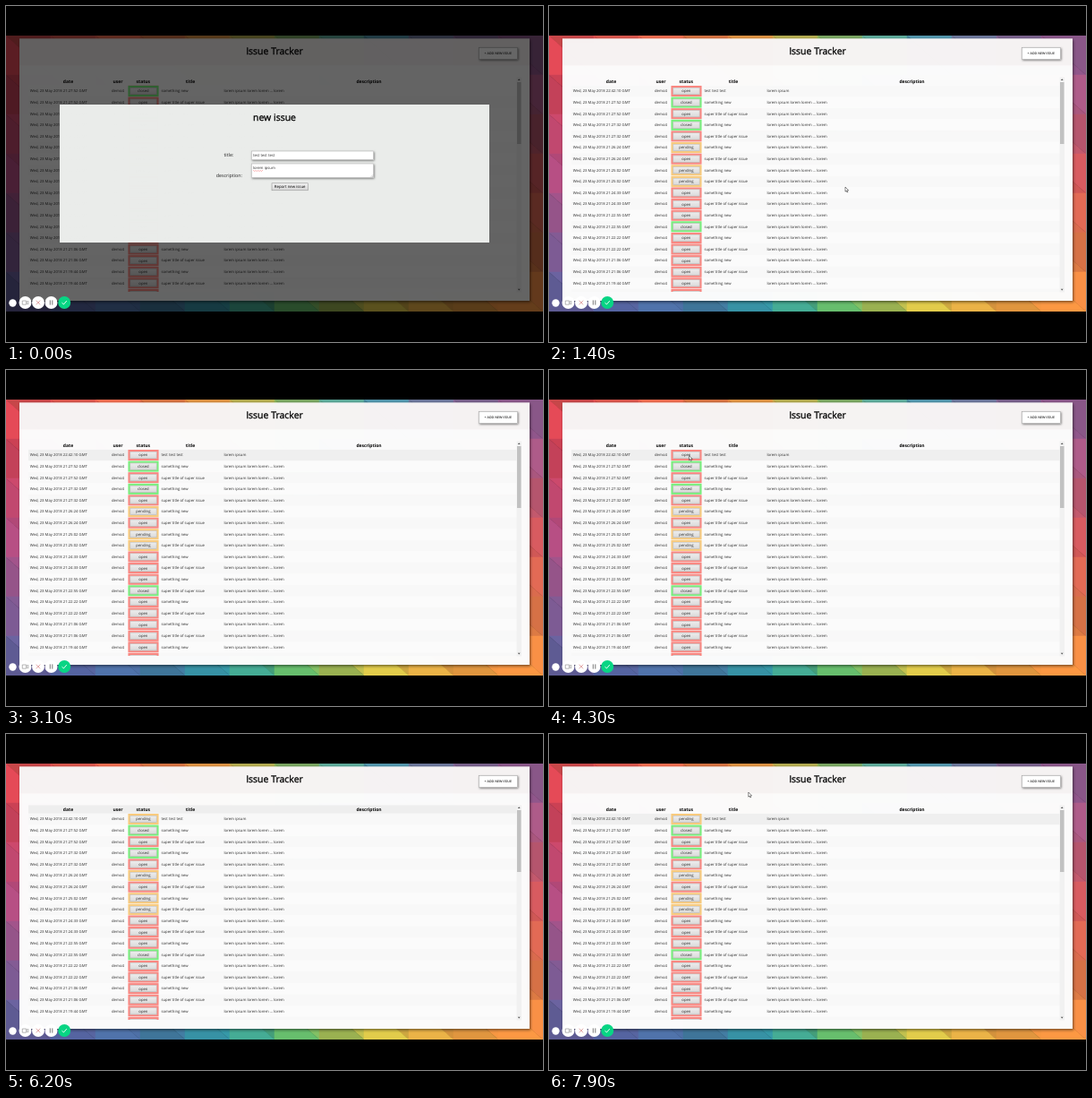
Recreate the animation shown at these times as an HTML page. Size 600 by 375 pixels, loop 8000 ms.

```html
<!DOCTYPE html>
<html lang="en">
<head>
<meta charset="utf-8">
<title>Issue Tracker</title>
<style>
  html, body { margin: 0; width: 100%; height: 100%; overflow: hidden; background: #000; }
  svg { display: block; width: 100vw; height: 100vh; font-family: "Open Sans", sans-serif; text-rendering: geometricPrecision; }
  .mid { text-anchor: middle; }
  .big { font-size: 10.5px; stroke: #000; stroke-width: .3; }
  .head { font-size: 5px; font-weight: 700; }
  .cell { font-size: 4.23px; fill: #2b2b2b; }
  .label { font-size: 5.3px; fill: #222; }
</style>
</head>
<body>
<svg id="stage" viewBox="0 0 600 375">
  <defs>
    <clipPath id="screen"><rect y="33" width="600" height="308"/></clipPath>
    <clipPath id="list"><rect x="25" y="88.6" width="546" height="230.4"/></clipPath>
    <linearGradient id="face" x2="0" y2="1"><stop stop-color="#f1f1f1"/><stop offset="1" stop-color="#d6d6d6"/></linearGradient>
    <filter id="soft" x="-10%" y="-20%" width="120%" height="140%"><feDropShadow dx=".8" dy="1" stdDeviation=".9" flood-opacity=".5"/></filter>
    <filter id="deep" x="-5%" y="-5%" width="110%" height="110%"><feDropShadow dx="1" dy="1.5" stdDeviation="1.5" flood-opacity=".55"/></filter>
  </defs>
  <g clip-path="url(#screen)">
    <g id="poly"></g>
    <g filter="url(#deep)">
      <rect x="15" y="36.5" width="570" height="292.5" fill="#fff" fill-opacity=".95"/>
    </g>
    <rect x="15" y="36.5" width="570" height="30" fill="#f3efef" fill-opacity=".6"/>
    <rect x="15" y="66.5" width="570" height="262.5" fill="#fcfcfc" fill-opacity=".6"/>
    <text class="big mid" x="300" y="54">Issue Tracker</text>
    <rect x="528.5" y="46.5" width="43" height="13" fill="#fff" stroke="#999" stroke-width=".5" filter="url(#soft)"/>
    <text class="mid" x="549.8" y="54.3" font-size="3.6" font-weight="600" fill="#222">+ ADD NEW ISSUE</text>
    <rect id="headHover" x="25" y="79.5" width="546" height="9.2" fill="#eee"/>
    <g id="heads"></g>
    <g clip-path="url(#list)"><g id="rows"></g></g>
    <rect x="570.5" y="79.5" width="5.5" height="240" fill="#f1f1f1"/>
    <rect x="571" y="85" width="4.5" height="69" fill="#c1c1c1"/>
    <path d="M571.8 83l1.4-1.7 1.4 1.7zM571.8 315.8l1.4 1.7 1.4-1.7z" fill="#555"/>

    <g id="modal">
      <rect y="33" width="600" height="308" fill="#000" fill-opacity=".6"/>
      <rect x="60" y="110" width="480" height="154" fill="#eef0ee" fill-opacity=".975"/>
      <text class="big mid" x="300" y="128">new issue</text>
      <text class="label" x="243.5" y="168.3">title:</text>
      <text class="label" x="234.8" y="191">description:</text>
      <g fill="#fff" stroke="#aaa" stroke-width=".5" filter="url(#soft)">
        <rect x="274.3" y="162" width="136.3" height="9.6"/>
        <rect x="274.3" y="176" width="136.3" height="15.5"/>
      </g>
      <text class="cell" x="276" y="168.3" font-size="4.3">test test test</text>
      <text class="cell" x="276" y="182.4" font-size="4.3">lorem ipsum</text>
      <path d="M276 184q.5-1 1 0t1 0 1 0 1 0 1 0 1 0 1 0 1 0 1 0 1 0 1 0" fill="none" stroke="#e33" stroke-width=".4"/>
      <path d="M407.5 191l2.6-2.6M409 191l1.1-1.1" stroke="#888" stroke-width=".4"/>
      <rect id="send" x="297" y="197.8" width="40.5" height="8" fill="url(#face)" stroke="#888" stroke-width=".5"/>
      <text class="mid" x="317.2" y="203.4" font-size="4.35">Report new issue</text>
    </g>
  </g>

  <g id="toolbar" fill="#fff">
    <circle cx="7.5" cy="331.5" r="4.2"/>
    <circle cx="21.5" cy="331" r="7"/>
    <circle cx="36" cy="331" r="7"/>
    <circle cx="50.5" cy="331" r="7"/>
    <circle cx="65.2" cy="331" r="7" fill="#08d584"/>
    <g fill="none" stroke="#999" stroke-width=".7">
      <path d="M18.3 329h4.3v4.2h-4.3zM22.6 330.5l2.2-1.2v3.6l-2.2-1.2"/>
      <path d="M33.7 328.7l4.6 4.6m0-4.6l-4.6 4.6" stroke="#d98a8a"/>
      <path d="M49.3 328.4v5.2m2.5-5.2v5.2" stroke="#777" stroke-width="1"/>
      <path d="M62.5 331.2l1.9 1.8 3.4-3.9" stroke="#fff" stroke-width=".9"/>
    </g>
  </g>
  <path id="cursor" d="M0 0v5.2l1.2-1.1.8 1.9.9-.4-.8-1.8h1.6z" fill="#fff" stroke="#000" stroke-width=".45"/>
</svg>
<script>
const LOOP = 8000, PITCH = 12.61, MODAL_END = 1400, STATUS_CHANGE = 4500;
const $ = id => document.getElementById(id);
const COLORS = { open: '#f98781', closed: '#78ee7c', pending: '#f8ca7d' };

// Low-poly backdrop: the hue runs round the screen.
const stops = [
  [-180, 180, 75, 125], [-158, 214, 66, 82], [-120, 232, 142, 66], [-85, 150, 185, 85],
  [-50, 65, 150, 165], [-24, 150, 85, 140], [0, 212, 88, 90], [27, 234, 140, 62],
  [50, 210, 190, 70], [85, 90, 178, 105], [115, 50, 155, 165], [148, 80, 100, 160], [180, 180, 75, 125]
];
let seed = 7;
const rand = () => (seed = seed * 16807 % 2147483647) / 2147483647;
function shade(x, y) {
  const a = Math.atan2(y - 187, x - 300) * 180 / Math.PI;
  const i = Math.max(1, stops.findIndex(s => s[0] >= a));
  const [p, q] = [stops[i - 1], stops[i]];
  const k = (a - p[0]) / (q[0] - p[0]), light = .92 + rand() * .16;
  return `rgb(${[1, 2, 3].map(c => Math.round((p[c] + (q[c] - p[c]) * k) * light))})`;
}
let art = '';
for (let x = 0; x < 600; x += 50)
  for (let y = 33; y < 341; y += 44)
    for (const [d, cx, cy] of [['h50v44z', 33, 15], ['v44h50z', 17, 29]]) {
      const c = shade(x + cx, y + cy);
      art += `<path d="M${x} ${y}${d}" fill="${c}" stroke="${c}" stroke-width=".5"/>`;
    }
$('poly').innerHTML = art;

$('heads').innerHTML = Object.entries({ date: 69.5, user: 125, status: 153.3, title: 206, description: 405.5 })
  .map(([name, x]) => `<text class="head mid" x="${x}" y="86">${name}</text>`).join('');

// Each time belongs to a pair of issues; the newest one stands alone.
const times = ['21:27:52', '21:27:32', '21:26:24', '21:25:02', '21:24:33', '21:22:55', '21:22:22', '21:21:06', '21:19:44', '21:18:20'];
const special = { 1: 'closed', 3: 'closed', 5: 'pending', 7: 'pending', 8: 'pending', 12: 'closed' };
function row(i) {
  const y = 95 + i * PITCH, status = special[i] || 'open';
  const title = !i ? 'test test test' : i % 2 ? 'something new' : 'super title of super issue';
  const cell = (x, s) => `<text class="cell" x="${x}" y="${y + 1.3}">${s}</text>`;
  return `<g><rect class="back" x="25" y="${y - 6.3}" width="546" height="${PITCH}" fill="${i % 2 ? '#fcfcfc' : '#f8f8f8'}" fill-opacity=".8"/>
    ${cell(26.8, `Wed, 23 May 2018 ${i ? times[(i - 1) >> 1] : '22:42:10'} GMT`)}
    ${cell(118, 'demo4')}${cell(173.5, title)}
    ${cell(243.5, i ? 'lorem ipsum lorem lorem ... lorem' : 'lorem ipsum')}
    <rect class="frame" x="137.5" y="${y - 5}" width="32" height="10" fill="url(#face)" stroke="${COLORS[status]}" stroke-width="2.1"/>
    <rect x="138.9" y="${y - 3.6}" width="29.2" height="7.2" fill="none" stroke="#aaa" stroke-width=".4"/>
    <text class="cell mid state" x="153.4" y="${y + 1.4}">${status}</text></g>`;
}
$('rows').innerHTML = Array.from({ length: 20 }, (_, i) => row(i)).join('');
const first = $('rows').firstElementChild;
const part = name => first.querySelector('.' + name);

// time, x, y, visible, hovered part
const keys = [
  [0, 345, 171, 0, ''], [500, 345, 171, 1, ''], [1200, 331, 202, 1, ''], [2300, 331, 202, 1, ''],
  [2900, 240, 95, 0, 'row'], [4000, 163, 97, 1, 'row'], [4200, 156.5, 95.5, 1, 'row'], [4600, 156.5, 95.5, 1, 'row'],
  [5100, 362, 150, 1, ''], [6000, 300, 84, 0, 'head'], [6950, 212, 84, 1, 'row'], [7700, 222.8, 65, 1, 'row'],
  [LOOP, 222.8, 65, 1, 'row']
];

function draw(now) {
  const t = now % LOOP, i = keys.findIndex(k => k[0] > t);
  const [a, b] = [keys[i - 1], keys[i]];
  const u = (t - a[0]) / (b[0] - a[0]), e = u * u * (3 - 2 * u);
  const [x, y] = [1, 2].map(c => a[c] + (b[c] - a[c]) * e);
  const show = (id, on) => $(id).setAttribute('visibility', on ? 'visible' : 'hidden');
  const modal = t < MODAL_END, status = t < STATUS_CHANGE ? 'open' : 'pending';

  $('cursor').setAttribute('transform', `translate(${x} ${y})`);
  show('cursor', a[3]);
  show('modal', modal);
  show('headHover', a[4] === 'head');
  $('rows').setAttribute('transform', `translate(0 ${modal ? -PITCH : 0})`);
  $('send').setAttribute('fill', t > 1000 ? '#d9d9d9' : 'url(#face)');
  part('back').setAttribute('fill', a[4] === 'row' ? '#ededed' : '#f8f8f8');
  part('frame').setAttribute('stroke', COLORS[status]);
  part('state').textContent = status;
  requestAnimationFrame(draw);
}
requestAnimationFrame(draw);
</script>
</body>
</html>
```
